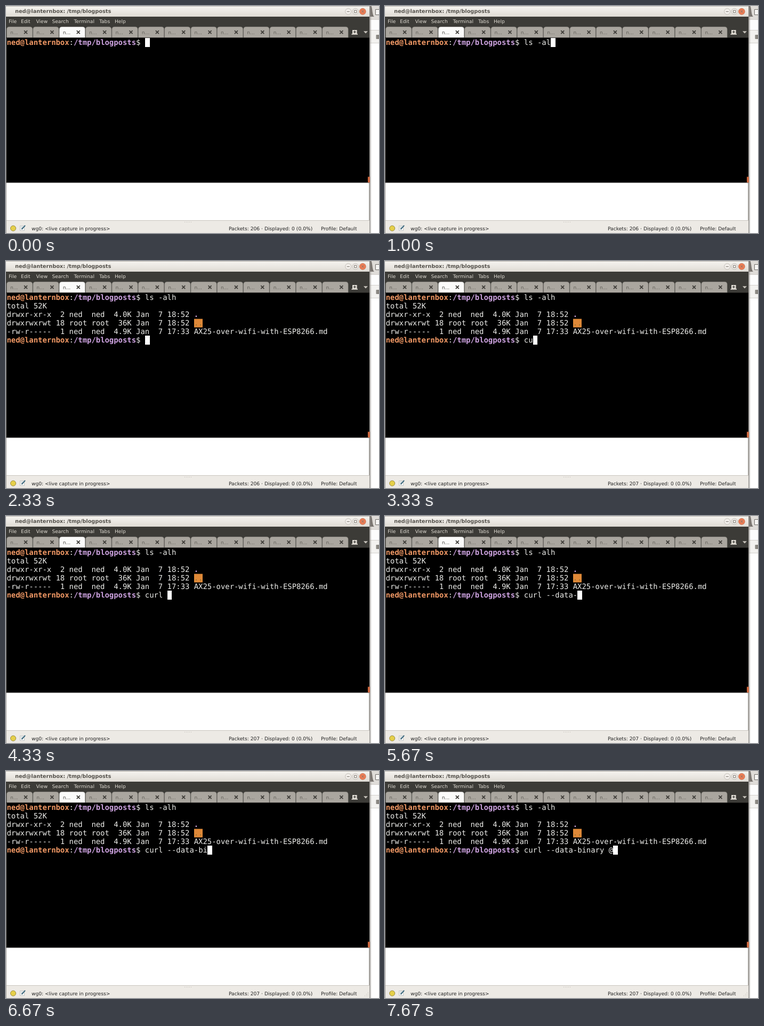
These frames come from a looping animation (700 by 426 pixels, 8000 ms). An HTML page:

```html
<!DOCTYPE html>
<html lang="en">
<head>
<meta charset="utf-8">
<title>Terminal</title>
<style>
html, body { margin: 0; width: 100%; height: 100%; overflow: hidden; background: #fff; }
#stage { position: relative; width: 700px; height: 426px; overflow: hidden; }
svg { position: absolute; left: 0; top: 0; }
svg text { font: 9.1px "DejaVu Sans", sans-serif; text-rendering: geometricPrecision; }
#term {
  position: absolute; left: 1.5px; top: 60px; margin: 0;
  font: 13.9px/16px "DejaVu Sans Mono", monospace;
  text-rendering: geometricPrecision; color: #ededea;
  transform: translateY(.6px);
}
#term b { color: #f39a66; }
#term b.path { color: #cfa4e2; }
#term .sticky { display: inline-block; height: 16px; vertical-align: top; background: #df8938; color: #94762f; }
#cursor { position: absolute; width: 8.6px; height: 16.4px; background: #fff; }
</style>
</head>
<body>
<div id="stage">
  <svg id="ui" width="700" height="426" viewBox="0 0 700 426">
    <defs>
      <linearGradient id="bar" x2="0" y2="1">
        <stop offset="0" stop-color="#f6f4f0"/><stop offset="1" stop-color="#dfdbd4"/>
      </linearGradient>
      <linearGradient id="shade">
        <stop offset="0" stop-color="#8f8c88"/><stop offset="1" stop-color="#8f8c88" stop-opacity="0"/>
      </linearGradient>
    </defs>

    <!-- window behind, right edge -->
    <rect x="682" width="18" height="426" fill="#fff"/>
    <rect x="682" width="18" height="25" fill="#dfdcd8"/>
    <path d="M682 0H685.5C688 4 687 17 691 20H682Z" fill="#78736e"/>
    <path d="M700.5 6.5H693.5V16.5H700.5" fill="#f7f6f4" stroke="#6d6a66"/>
    <rect x="682" y="25" width="18" height="45" fill="#f3f2f0"/>
    <rect x="682" y="26" width="18" height="19" fill="#fdfdfd"/>
    <path d="M682 25.5H700M682 45.5H700M682 69.5H700" stroke="#d2cfcb"/>
    <rect x="694.5" y="54" width="6" height="8" rx="1" fill="#8a8782"/>
    <rect x="682" width="4" height="426" fill="url(#shade)"/>

    <!-- terminal window -->
    <rect width="682" height="20" fill="url(#bar)"/>
    <path d="M0 .5H682" stroke="#b9b5ae"/>
    <text x="17" y="12.8" fill="#55524c" style="font-size:9.75px;font-weight:bold">ned@lanternbox: /tmp/blogposts</text>
    <g stroke="#b7b2aa" stroke-width=".8" fill="#f1eeea">
      <circle cx="642.3" cy="10.3" r="5.6"/><circle cx="655.8" cy="10.3" r="5.6"/>
      <circle cx="669.4" cy="10.3" r="5.9" fill="#ec7d55" stroke="#c07152"/>
    </g>
    <path d="M639.8 10.5H644.8M653.6 8.2H658V12.6H653.6ZM667.2 8.1L671.6 12.5M671.6 8.1L667.2 12.5" fill="none" stroke="#7a756d"/>
    <rect y="20" width="682" height="40" fill="#3c3b37"/>
    <g id="menu" fill="#dfdbd2"></g>
    <g id="tabs"></g>
    <path d="M650 45H658.7V52H650ZM648.5 52H660V53.8H648.5Z" fill="#dedad2"/>
    <path d="M654.4 46.2V51M652 48.6H656.8" stroke="#3c3b37" stroke-width="1.3"/>
    <path d="M671 47.2H679L675 51.4Z" fill="#c9c5bd"/>
    <rect y="59.5" width="682" height="272" fill="#000"/>
    <path d="M.5 60V332" stroke="#77746f"/>
    <rect x="679" y="320.5" width="4" height="11" fill="#cf6840"/>

    <!-- capture window below -->
    <rect y="332" width="682" height="71" fill="#fff"/>
    <path d="M0 331.7H682" stroke="#6f6d6a" stroke-width=".7"/>
    <path d="M.5 332V426M681.5 332V403" stroke="#aaa7a2"/>
    <rect x="1" y="402" width="681" height="24" fill="#edeae5"/>
    <path d="M1 402.5H682" stroke="#c9c5bf"/>
    <path d="M335 405.5H348" stroke="#bdb9b3" stroke-dasharray="1 2"/>
    <circle cx="13.5" cy="417.2" r="5" fill="#e5cf49" stroke="#8e8037" stroke-width=".9"/>
    <path d="M26.5 412.5H34.5V421.5H26.5Z" fill="#fafaf8" stroke="#b3b7b8" stroke-width=".8"/>
    <path d="M28 414.7H32M28 416.7H31M28 418.7H30" stroke="#9fb0b8" stroke-width=".8"/>
    <path d="M29.5 419L36 411.8" stroke="#39667c" stroke-width="2"/>
    <g fill="#222">
      <text x="48" y="420.5">wg0: &lt;live capture in progress&gt;</text>
      <text x="418" y="420.5" id="packets" style="font-size:9.16px"></text>
      <text x="591" y="420.5">Profile: Default</text>
    </g>
    <path id="grip" d="M679 416h1M676 419h1M679 419h1M673 422h1M676 422h1M679 422h1" stroke="#bcb7b0" stroke-width="1.2"/>
  </svg>
  <pre id="term"></pre>
  <div id="cursor"></div>
</div>
<script>
const $ = id => document.getElementById(id);
const LOOP = 8000, CELL = 8.37, ROW = 16;
const PROMPT = '<b>ned@lanternbox</b>:<b class="path">/tmp/blogposts</b>$ ';
const PROMPT_LEN = 31;
const LISTING = [
  'total 52K',
  'drwxr-xr-x  2 ned  ned  4.0K Jan  7 18:52 <b class="path">.</b>',
  'drwxrwxrwt 18 root root  36K Jan  7 18:52 <span class="sticky">..</span>',
  '-rw-r-----  1 ned  ned  4.9K Jan  7 17:33 AX25-over-wifi-with-ESP8266.md'
].join('\n');

// [start time, characters typed]
const LIST_CMD = 'ls -alh';
const LIST_KEYS = [[0, 0], [330, 1], [670, 4], [1000, 6], [1670, 7]];
const SEND_CMD = 'curl --data-binary @';
const SEND_KEYS = [
  [2330, 0], [3000, 1], [3330, 2], [3670, 3], [4000, 4], [4330, 5],
  [4670, 7], [5000, 8], [5330, 10], [5670, 12], [6000, 13],
  [6670, 14], [7000, 16], [7330, 18], [7670, 20]
];
const ENTER = 2330, PACKET = 2670;

const MENU = { File: 5, Edit: 28, View: 56.5, Search: 86.5, Terminal: 127.5, Tabs: 175, Help: 204 };
$('menu').innerHTML = Object.entries(MENU)
  .map(([name, x]) => `<text x="${x}" y="32">${name}</text>`).join('');

function tab(i) {
  const x = 1.3 + i * 49.37, on = i === 2;
  return `<g transform="translate(${x.toFixed(2)} 0)">
    <path d="M0 59.5V44Q0 39 5 39H43.5Q48.5 39 48.5 44V59.5Z" fill="${on ? '#fbfbfa' : '#aaa69f'}" stroke="#6d6a64" stroke-width=".5"/>
    <text x="6.7" y="52.5" fill="${on ? '#4b4944' : '#64615b'}">n...</text>
    <path d="M32.7 46.2L38.7 52.2M38.7 46.2L32.7 52.2" stroke="#3f3d39" stroke-width="1.8"/>
  </g>`;
}
$('tabs').innerHTML = Array.from({ length: 13 }, (_, i) => tab(i)).join('');

const typed = (keys, t) => keys.reduce((n, [at, count]) => t >= at ? count : n, 0);

let shown = '';
function draw(t) {
  const done = t >= ENTER;
  const n = done ? typed(SEND_KEYS, t) : typed(LIST_KEYS, t);
  const text = done
    ? `${PROMPT}${LIST_CMD}\n${LISTING}\n${PROMPT}${SEND_CMD.slice(0, n)}`
    : PROMPT + LIST_CMD.slice(0, n);
  if (text !== shown) $('term').innerHTML = shown = text;
  $('cursor').style.left = 1.5 + (PROMPT_LEN + n) * CELL + 'px';
  $('cursor').style.top = 60.3 + (done ? 5 : 0) * ROW + 'px';
  $('packets').textContent = `Packets: ${t >= PACKET ? 207 : 206} · Displayed: 0 (0.0%)`;
  $('grip').style.opacity = t >= 6000 ? 1 : 0;
}

const start = performance.now();
function tick() {
  draw((performance.now() - start) % LOOP);
  requestAnimationFrame(tick);
}
tick();
</script>
</body>
</html>
```
